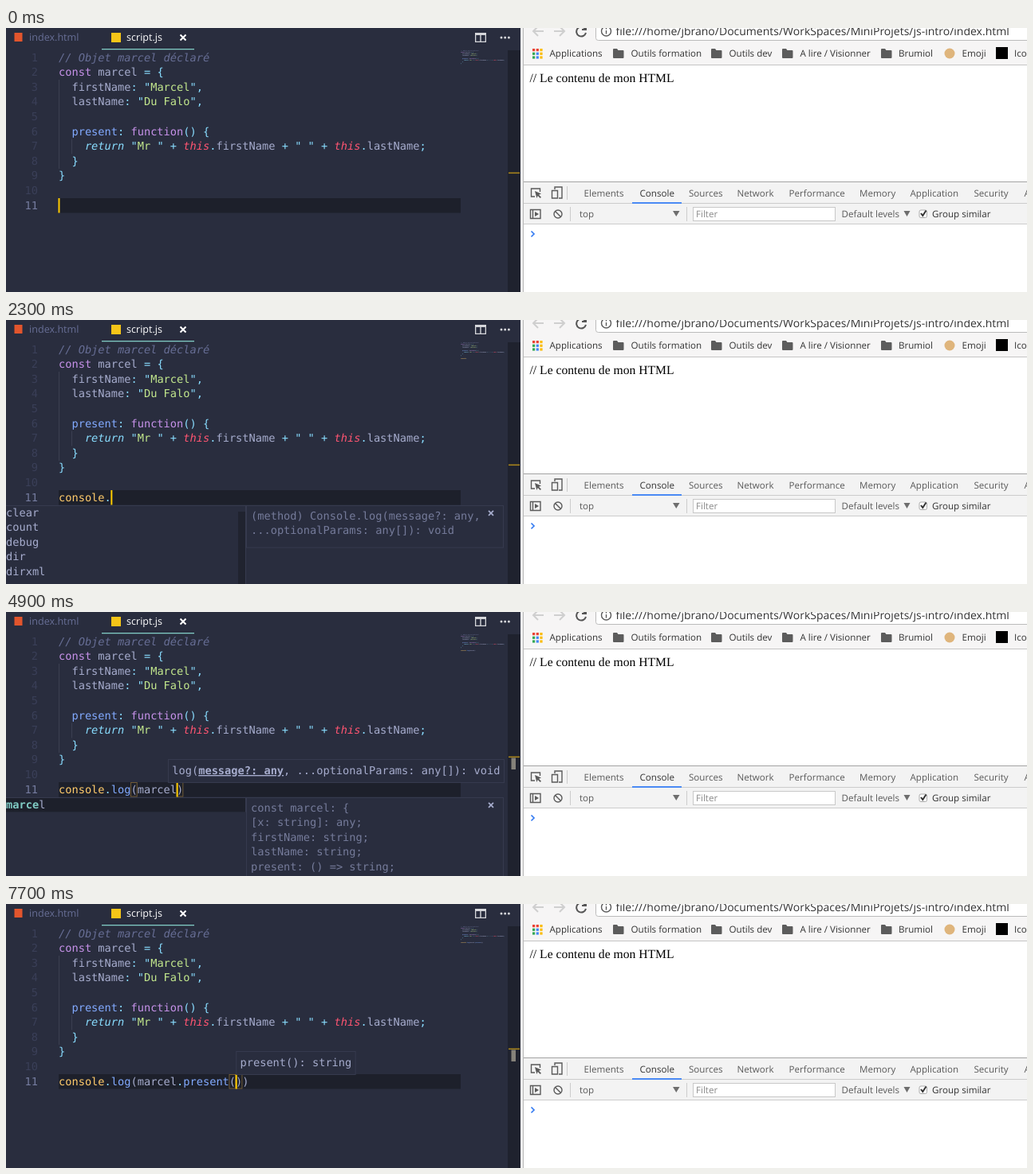
Write an HTML page that moves like this. It is 1280 px wide and 332 px high and loops after 8000 ms.

```html
<!DOCTYPE html>
<html lang="fr">
<head>
<meta charset="utf-8">
<title>Console demo</title>
<style>
  html, body { margin: 0; width: 100%; height: 100%; overflow: hidden; background: #fff; }
  svg { display: block; }
  text { white-space: pre; text-rendering: geometricPrecision; }
  .mono { font: 13.67px "DejaVu Sans Mono", monospace; fill: #a6accd; }
  .ui { font: 11.6px "Open Sans", sans-serif; fill: #333; }
  .tools { fill: #5a5a5a; }
  .tab { font-size: 12.6px; }
  .url { font-size: 14px; }
  .page { font: 15.63px "Liberation Serif", serif; fill: #000; }
  .dim { fill: #757b9a; }
  .hit { fill: #80cbc4; font-weight: bold; }
  .param { font-weight: bold; text-decoration: underline; }
  .box { fill: #292d3e; stroke: #363a4e; }
  .line { fill: none; stroke: #5a5a5a; stroke-width: 1.4; }
  #minimap .mono { font-weight: bold; }
</style>
</head>
<body>
<svg width="1280" height="332" viewBox="0 0 1280 332">
  <!-- editor -->
  <rect width="645" height="332" fill="#292d3e"/>
  <rect x="629" y="28" width="16" height="304" fill="#1f222e"/>
  <rect x="10.500" y="6" width="10" height="11" fill="#e2552d"/>
  <text class="ui tab" x="29" y="16" style="fill:#676e95">index.html</text>
  <rect x="132" y="6" width="12" height="12" fill="#f5c518"/>
  <text class="ui tab" x="151" y="16" style="fill:#fff">script.js</text>
  <path class="line" d="M218.500 8.500l7 7m0-7l-7 7" style="stroke:#fff;stroke-width:2"/>
  <rect x="120" y="26" width="116" height="1.3" fill="#80cbc4"/>
  <path d="M588 6h14v12h-14zM589.300 9v7.700h5V9zM595.700 9v7.700h5V9z" fill="#d5d6da" fill-rule="evenodd"/>
  <g fill="#d5d6da"><circle cx="621" cy="12" r="1.5"/><circle cx="625.700" cy="12" r="1.5"/><circle cx="630.400" cy="12" r="1.5"/></g>
  <rect x="66" y="214" width="504" height="18.500" fill="#1d202b"/>
  <path d="M66.500 65v112M82.500 139.500v19" stroke="#3b3f51"/>
  <g id="code"></g>
  <g id="minimap" transform="translate(570 28) scale(.1187 .105) translate(-66 -28)"></g>
  <rect x="630" y="181.500" width="14" height="1.6" fill="#a5821c"/>
  <g id="live"></g>

  <!-- browser -->
  <rect x="645" width="635" height="332" fill="#fff"/>
  <rect x="645" width="635" height="46" fill="#f6f5f5"/>
  <path d="M645 46.500h635" stroke="#c4c4c4"/>
  <rect x="645" width="3" height="332" fill="#f0f0f0"/>
  <path d="M648.500 0v332" stroke="#b8b8b8"/>
  <g fill="none" stroke-width="2">
    <path d="M667 -2l-6 6 6 6M661 4h13M694 -2l6 6-6 6M700 4h-13" stroke="#cfcfcf"/>
    <path d="M726 1a6 6 0 1 0 1 5M727 -2v4h-5" stroke="#555"/>
  </g>
  <rect x="739.500" y="-20" width="600" height="35.500" rx="3" fill="#fff" stroke="#bbb"/>
  <circle class="line" cx="752.500" cy="4" r="6"/>
  <path class="line" d="M752.500 3v4.500M752.500 0v1.600"/>
  <text class="ui url" x="764.500" y="9">file:///home/jbrano/Documents/WorkSpaces/MiniProjets/js-intro/index.html</text>
  <g id="browser"></g>
  <circle cx="1183" cy="32" r="6.500" fill="#dfb57c"/>
  <rect x="1241" y="24" width="15" height="15" fill="#000"/>
  <text class="page" x="656.500" y="68">// Le contenu de mon HTML</text>

  <!-- developer tools -->
  <rect x="649" y="194" width="631" height="53" fill="#f3f3f3"/>
  <path d="M649 193.500h631" stroke="#a3a3a3"/>
  <path d="M649 220.500h631M649 246.500h631M707.500 225v18M853.500 225v18M703.500 199v17" stroke="#ccc"/>
  <rect x="785" y="219" width="62" height="2" fill="#4a8af4"/>
  <path class="line" d="M663 212h-4.500v-10h11v4"/>
  <path d="M663 205l8 3.500-3 1.200 3 3-1.300 1.300-3-3-1.300 3z" fill="#5a5a5a"/>
  <path class="line" d="M688 203v-3h9v14h-4M684.500 204.500h7v9.500h-7z"/>
  <path class="line" d="M657.500 228.500h12.500v11h-12.500zM660.500 229v10"/>
  <path d="M663 231l5 3-5 3z" fill="#5a5a5a"/>
  <circle class="line" cx="692" cy="234" r="5"/>
  <path class="line" d="M688.500 230.500l7 7"/>
  <path d="M836 230h8.500l-4.250 7zM1125.500 230h8l-4 7z" fill="#6e6e6e"/>
  <rect x="861.500" y="225.500" width="178" height="17" fill="#fff" stroke="#c8c8c8"/>
  <rect x="1145" y="229" width="9.500" height="9.500" rx="2" fill="#fff" stroke="#aaa"/>
  <path d="M1147 233l2.300 3 4.200-6.500" fill="none" stroke="#333" stroke-width="2"/>
  <path d="M658.500 255.500l3.500 3.500-3.500 3.500" fill="none" stroke="#367cf1" stroke-width="1.7"/>
  <g id="tools"></g>
</svg>
<script>
const LEFT = 66, TOP = 28, ROW = 18.6, ADV = 8.23, POP_TOP = 233, ASCENT = 13.6;
const byId = id => document.getElementById(id);
const esc = s => s.replace(/&/g, '&amp;').replace(/</g, '&lt;').replace(/>/g, '&gt;');
const span = (s, attrs) => `<tspan ${attrs}>${esc(s)}</tspan>`;
const mono = (x, y, inner, cls = '') => `<text class="mono ${cls}" x="${x}" y="${y}">${inner}</text>`;
const rect = (x, y, w, h, attrs) => `<rect x="${x}" y="${y}" width="${w}" height="${h}" ${attrs}/>`;
const label = (x, y, s, cls = '') => `<text class="ui ${cls}" x="${x}" y="${y}">${s}</text>`;
const baseline = row => TOP + ROW * row + ASCENT;

// Browser labels
const folder = x => `<path d="M${x} 27q0-1 1-1h4l1.500 2h6q1 0 1 1v8q0 1-1 1h-11.500q-1 0-1-1z" fill="#5c5c5c"/>`;
const appColors = ['#ea4335', '#ea4335', '#fbbc05', '#34a853', '#4285f4', '#fbbc05', '#34a853', '#4285f4', '#fbbc05'];
byId('browser').innerHTML =
  appColors.map((c, i) => rect(660 + i % 3 * 4.7, 26 + Math.floor(i / 3) * 4.7, 3.2, 3.2, `fill="${c}"`)).join('') +
  [761, 884, 973, 1097].map(folder).join('') +
  [[681.5, 'Applications'], [783.5, 'Outils formation'], [906.5, 'Outils dev'], [995.5, 'A lire / Visionner'],
   [1119, 'Brumiol'], [1198.5, 'Emoji'], [1264, 'Icones']].map(([x, s]) => label(x, 36, s)).join('');
byId('tools').innerHTML =
  [[724.5, 'Elements'], [794.5, 'Console'], [856, 'Sources'], [916.5, 'Network'], [981.5, 'Performance'],
   [1070, 'Memory'], [1133.5, 'Application'], [1213.5, 'Security'], [1276.5, 'Audits']]
    .map(([x, s]) => label(x, 211.6, s, s === 'Console' ? '' : 'tools')).join('') +
  label(719, 238, 'top', 'tools') + label(1047.5, 238, 'Default levels', 'tools') + label(1161, 238, 'Group similar') +
  '<text class="ui" x="865" y="238" style="fill:#8a8a8a">Filter</text>';

// Syntax colours
const rules = [
  [/^\/\/.*/, 'fill="#676e95" font-style="italic"'],
  [/^(const|function)\b/, 'fill="#c792ea"'],
  [/^return\b/, 'fill="#89ddff" font-style="italic"'],
  [/^this\b/, 'fill="#ff5572" font-style="italic"'],
  [/^console\b/, 'fill="#ffcb6b"'],
  [/^(present|log)(?=[:(])/, 'fill="#82aaff"'],
  [/^(\(\) (?=\{)|[={}:;.+,])/, 'fill="#89ddff"'],
  [/^(\w+|\s+|.)/, '']
];
function highlight(s) {
  let out = '';
  while (s) {
    const str = /^"([^"]*)"/.exec(s);
    if (str) {
      out += span('"', 'fill="#89ddff"') + span(str[1], 'fill="#c3e88d"') + span('"', 'fill="#89ddff"');
      s = s.slice(str[0].length);
      continue;
    }
    const [re, attrs] = rules.find(([r]) => r.test(s));
    const token = re.exec(s)[0];
    out += span(token, attrs);
    s = s.slice(token.length);
  }
  return out;
}

const source = `// Objet marcel déclaré
const marcel = {
  firstName: "Marcel",
  lastName: "Du Falo",

  present: function() {
    return "Mr " + this.firstName + " " + this.lastName;
  }
}`.split('\n');
const codeLine = (s, row) => mono(LEFT, baseline(row), highlight(s));
const body = source.map(codeLine).join('');
const numbers = Array.from({ length: 11 }, (_, i) =>
  `<text class="mono" x="40" y="${baseline(i)}" text-anchor="end" style="fill:${i < 10 ? '#3a3f58' : '#757c9f'}">${i + 1}</text>`);
byId('code').innerHTML = body + numbers.join('');

// Suggestions
const formTypes = ['HTMLFormControlsCollection', 'SVGComponentTransferFunctionElement'];
const consoleDoc = ['var console: Console'];
const logDoc = ['(method) Console.log(message?: any,', '...optionalParams: any[]): void'];
const objectDoc = ['const marcel: {', '[x: string]: any;', 'firstName: string;', 'lastName: string;', 'present: () => string;'];
const popups = {
  c: { items: ['caches', 'clearInterval', 'clearTimeout', 'close', 'closed'], doc: ['var caches: CacheStorage'] },
  co: { items: ['confirm', 'console', 'const', 'continue', 'Console'], doc: ['function confirm(message?: string):', 'boolean'] },
  cons: { items: ['console', 'const', 'Console', ...formTypes], doc: consoleDoc },
  console: { items: ['console', 'Console', ...formTypes], doc: consoleDoc },
  methods: { items: ['clear', 'count', 'debug', 'dir', 'dirxml'], doc: logDoc, scrolled: true },
  log: { items: ['log'], doc: logDoc },
  m: { items: ['marcel', 'matchMedia', 'moveBy', 'moveTo', 'Map'], doc: objectDoc },
  marcel: { items: ['marcel'], doc: objectDoc },
  members: { items: ['firstName', 'lastName', 'present', 'console', 'log'], doc: ['(property) firstName: string'] },
  present: { items: ['present'], doc: ['(property) present: () => string'] }
};

// A prefix match wins; otherwise letters are matched from the right.
function markHits(item, query) {
  const low = item.toLowerCase(), hits = new Set();
  if (low.startsWith(query)) for (let i = 0; i < query.length; i++) hits.add(i);
  else {
    let at = low.length;
    for (const ch of [...query].reverse()) {
      at = low.lastIndexOf(ch, at - 1);
      if (at < 0) break;
      if (low[at - 1] === ch) at--;
      hits.add(at);
    }
  }
  return [...item].map((ch, i) => hits.has(i) ? span(ch, 'class="hit"') : ch).join('');
}

function drawPopup({ items, doc, scrolled }, query) {
  const height = items.length < 5 ? items.length * ROW - 1 : 110;
  return rect(-1, POP_TOP + .5, 301.5, height, 'class="box"') +
    (scrolled ? rect(291, 241, 9, 91, 'fill="#20232f"') : rect(0, POP_TOP + 1, 300, ROW - 1, 'fill="#1d202b"')) +
    items.map((s, i) => mono(0, POP_TOP + ASCENT + i * ROW, markHits(s, query))).join('') +
    rect(301.5, POP_TOP + .5, 322, 15.5 + ROW * doc.length, 'class="box"') +
    doc.map((s, i) => mono(307, POP_TOP + 4 + ASCENT + i * ROW, esc(s), 'dim')).join('') +
    '<path d="M605 239.800l6 6m0-6l-6 6" stroke="#a6accd" stroke-width="1.7"/>';
}

function drawHint(typed, y) {
  const own = typed.endsWith('present(');
  const plain = own ? 'present(): string' : 'log(message?: any, ...optionalParams: any[]): void';
  const width = plain.length * ADV + 10.5;
  const x = Math.min(LEFT + typed.length * ADV, 625 - width);
  return rect(x + .5, y + .5, width - 1, 29, 'class="box"') +
    mono(x + 5.3, y + 19, plain.replace('message?: any', s => span(s, 'class="param"')));
}

// [start ms, text before the caret, popup, matched letters, hint top, caret hidden]
const LOG = 'console.log(', OBJ = LOG + 'marcel';
const steps = [
  [0, ''], [200, '', '', '', 0, true],
  [400, 'c'], [500, 'c', 'c', 'c'], [600, 'co', 'co', 'co'],
  [1000, 'con', 'co', 'co'], [1100, 'con', 'cons', 'con'], [1200, 'cons', 'cons', 'cons'],
  [1400, 'consol', 'console', 'consol'], [1500, 'console', 'console', 'consol'], [1600, 'console', 'console', 'console'],
  [2000, 'console', 'console', 'console', 0, true],
  [2200, 'console.'], [2300, 'console.', 'methods', ''],
  [3100, 'console.l', 'methods', ''], [3200, 'console.l', 'log', 'l'], [3300, 'console.lo', 'log', 'lo'],
  [3400, 'console.log', 'log', 'log'], [3500, LOG], [3800, LOG, '', '', 165],
  [3900, LOG + 'm', '', '', 185], [4000, LOG + 'm', 'm', 'm', 185],
  [4300, LOG + 'mar', 'marcel', 'mar', 185], [4500, LOG + 'marce', 'marcel', 'marce', 185],
  [4900, OBJ, 'marcel', 'marce', 185], [5000, OBJ, 'marcel', 'marcel', 185],
  [5400, OBJ, 'marcel', 'marcel', 185, true],
  [5600, OBJ + '.', 'members', '', 185], [6000, OBJ + '.p', 'members', '', 185],
  [6100, OBJ + '.pre', 'present', 'pre', 185], [6400, OBJ + '.pres', 'present', 'pres', 185],
  [6500, OBJ + '.prese', 'present', 'prese', 185], [7000, OBJ + '.presen', 'present', 'prese', 185],
  [7100, OBJ + '.present', 'present', 'prese', 185], [7300, OBJ + '.present', 'present', 'present', 185],
  [7600, OBJ + '.present('], [7700, OBJ + '.present(', '', '', 185]
];

function draw([, typed, popup, query, hintTop, hidden]) {
  const line = typed + ')'.repeat(typed.split('(').length - 1);
  const open = typed.lastIndexOf('(');
  const current = codeLine(line, 10);
  let out = '';
  if (open >= 0) {
    out += rect(633.5, 183.5, 5.5, 14.5, 'fill="#85827a"');
    for (const col of [open, typed.length])
      out += rect(LEFT + col * ADV, 214.5, 7.7, 17.5, 'fill="none" stroke="#705a35"');
  }
  out += current;
  if (!hidden) out += rect(LEFT - .5 + typed.length * ADV, 214, 2, 18.5, 'fill="#ffcc00"');
  if (hintTop) out += drawHint(typed, hintTop);
  if (popup) out += drawPopup(popups[popup], query);
  byId('live').innerHTML = out;
  byId('minimap').innerHTML = body + current;
}

let shown;
function tick() {
  const t = performance.now() % 8000;
  const step = steps.findLast(s => s[0] <= t);
  if (step !== shown) draw(shown = step);
  requestAnimationFrame(tick);
}
tick();
</script>
</body>
</html>
```
